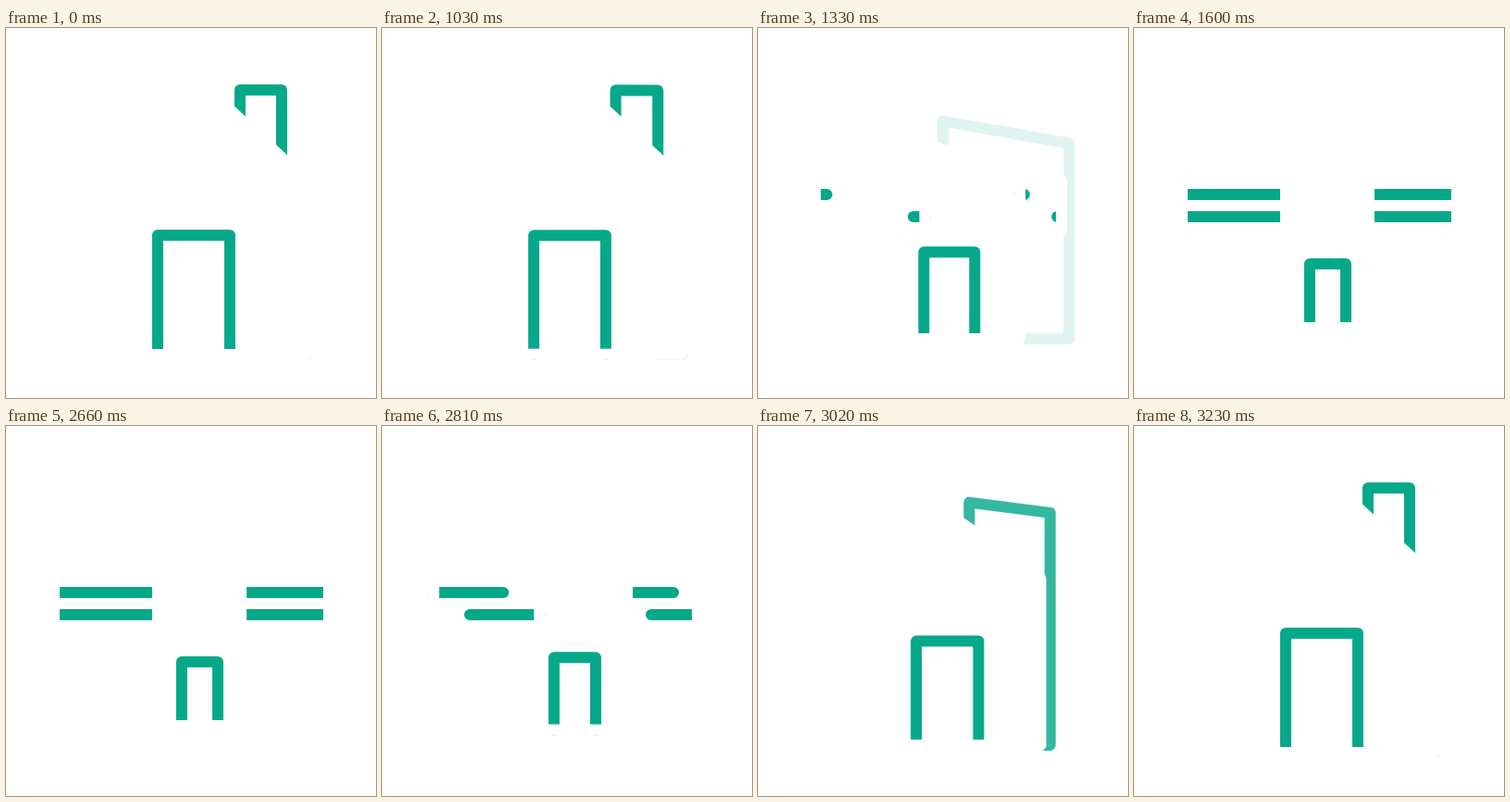
These frames come from a looping animation (400x400 px, 3260 ms). An HTML page:

```html
<!DOCTYPE html>
<html lang="en">
<head>
<meta charset="utf-8">
<title>House and tower</title>
<style>
  html, body { margin: 0; width: 100%; height: 100%; overflow: hidden; background: #fff; }
  svg { display: block; width: 100%; height: 100%; }
  path { fill: none; stroke: #06a88a; stroke-width: 12; stroke-linecap: round; stroke-linejoin: round; }
  .wall { stroke: #fff; }
  #house { fill: #fff; }
</style>
</head>
<body>
<svg viewBox="0 0 400 400">
  <path id="chimney"/>
  <path id="house" class="wall"/>
  <path id="bars"/>
  <path id="sides" class="wall"/>
  <path id="door"/>
  <path id="ground" class="wall"/>
</svg>
<script>
const LOOP = 3260, STEP = 30, MORPH = 600;
const start = performance.now();
const el = id => document.getElementById(id);
const mix = (a, b, k) => a + (b - a) * k;
const clamp = v => Math.min(1, Math.max(0, v));
const easeInOut = u => u < 0.5 ? 2 * u * u : 1 - 2 * (1 - u) ** 2;
const stepped = (t, base) => base + Math.floor((t - base + 0.01) / STEP) * STEP;

// 0 is the house, 1 is the tower.
function progress(t) {
  if (t < 1030 || t >= 3230) return 0;
  if (t < 1600) return easeInOut(clamp((stepped(t, 1030) - 1002) / MORPH));
  if (t < 2660) return 1;
  return 1 - easeInOut(clamp((stepped(t, 2660) - 2642) / MORPH));
}

const line = (...points) => "M" + points.map(p => p.join(" ")).join("L");

function draw(p) {
  const at = (x1, y1, x2, y2) => [mix(x1, x2, p), mix(y1, y2, p)];
  const set = (id, d) => el(id).setAttribute("d", d);
  const base = mix(353, 324, p);
  const left = mix(76, 52, p), middle = mix(204, 164, p);
  const right = mix(325, 254, p), far = mix(298, 349, p);

  set("chimney", line(at(253, 105, 163, 140), at(253, 67, 163, 124),
    at(298, 67, 363, 165), at(298, 353, 363, 324), [right, base]));
  el("chimney").style.opacity = 1 - clamp((p / 0.63) ** 2);

  set("house", line(at(76, 167, 52, 160), at(203, 52, 164, 174),
    [right, 165], [right, base], [left, base]) + "Z");

  // Upper bars grow rightwards, lower bars leftwards.
  const grown = clamp((p - 0.54) / 0.46);
  const pair = (a, b) => line([a, 180], [mix(a, b, grown), 180]) +
    line([b, 204], [mix(b, a, grown), 204]);
  set("bars", grown ? pair(left, middle) + pair(right, far) : "");
  set("sides", grown ? [left, middle, right, far].map(x => line([x, 165], [x, 220])).join("") : "");

  set("door", line(at(164, 353, 190, 324), at(164, 224, 190, 255),
    at(242, 224, 229, 255), at(242, 353, 229, 324)));
  set("ground", line([left, base], [right, base]));
}

function frame() {
  draw(progress((performance.now() - start) % LOOP));
  requestAnimationFrame(frame);
}
frame();
</script>
</body>
</html>
```
